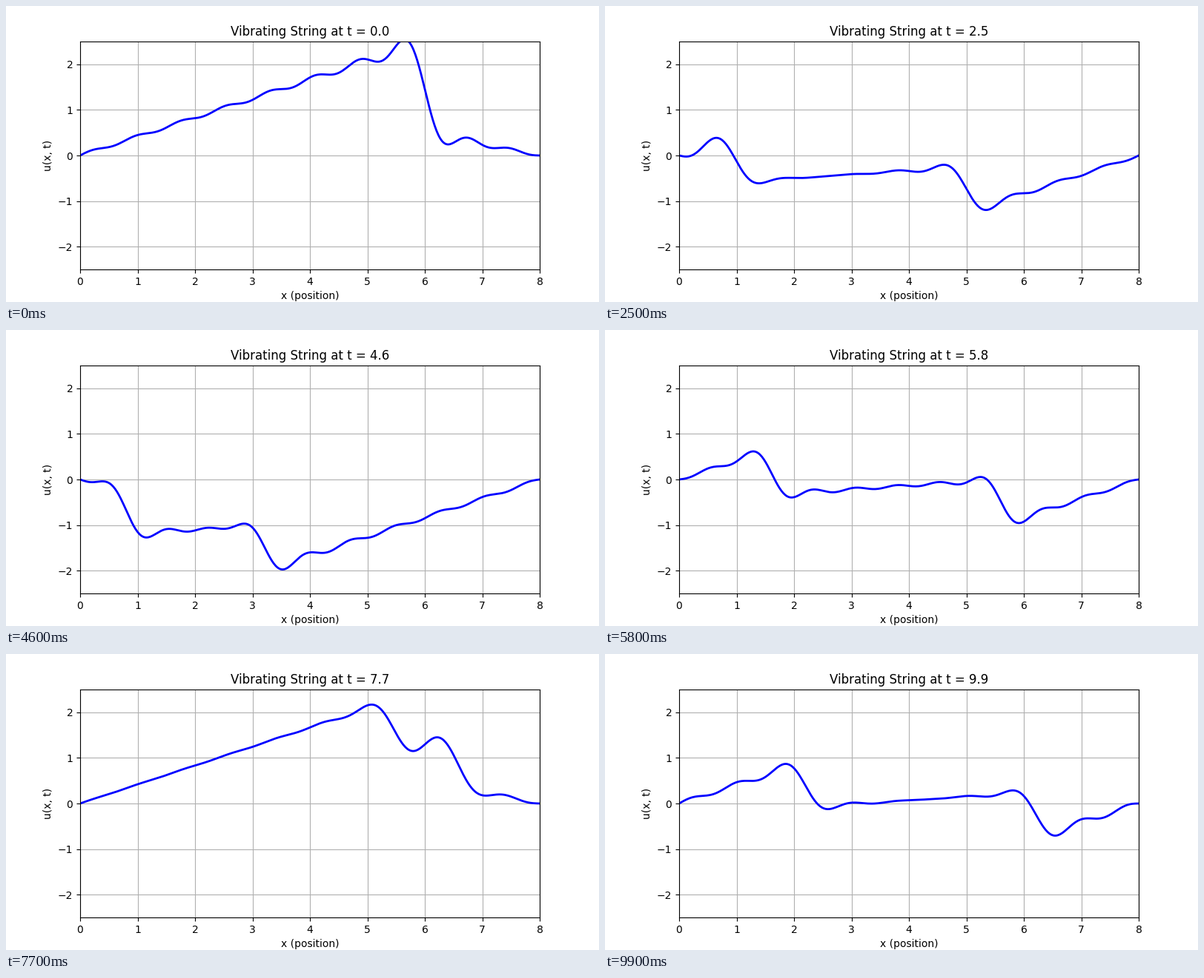
These frames come from a looping animation (800 px wide and 400 px high, 10 s). A matplotlib script:

```python
import numpy as np
import matplotlib.pyplot as plt
from matplotlib.animation import FuncAnimation

L = 8.0        # string length
A = 6.0        # position of the jump
C = 2.0        # wave speed
TERMS = 20
FRAMES = 100
DT = 0.1

# Sine coefficients of 5x/12 on [0, A] and (L - x)/4 on [A, L]
k = np.arange(1, TERMS + 1) * np.pi / L
sin_a, cos_a = np.sin(k * A), np.cos(k * A)
rise = 5 / 12 * (sin_a / k**2 - A * cos_a / k)
fall = 1 / 4 * (sin_a / k**2 + (L - A) * cos_a / k)
b = 2 / L * (rise + fall)

x = np.linspace(0, L, 500)
modes = np.sin(np.outer(x, k))


def u(t):
    return modes @ (b * np.cos(C * k * t))


fig, ax = plt.subplots(figsize=(8, 4), dpi=100)
line, = ax.plot(x, u(0), color="blue", lw=2)
ax.set_xlim(0, L)
ax.set_ylim(-2.5, 2.5)
ax.set_xlabel("x (position)")
ax.set_ylabel("u(x, t)")
ax.grid(True)
title = ax.set_title("Vibrating String at t = 0.0")


def update(i):
    t = i * DT
    line.set_ydata(u(t))
    title.set_text(f"Vibrating String at t = {t:.1f}")
    return line, title


anim = FuncAnimation(fig, update, frames=FRAMES, interval=100, repeat=True)
plt.show()
```
